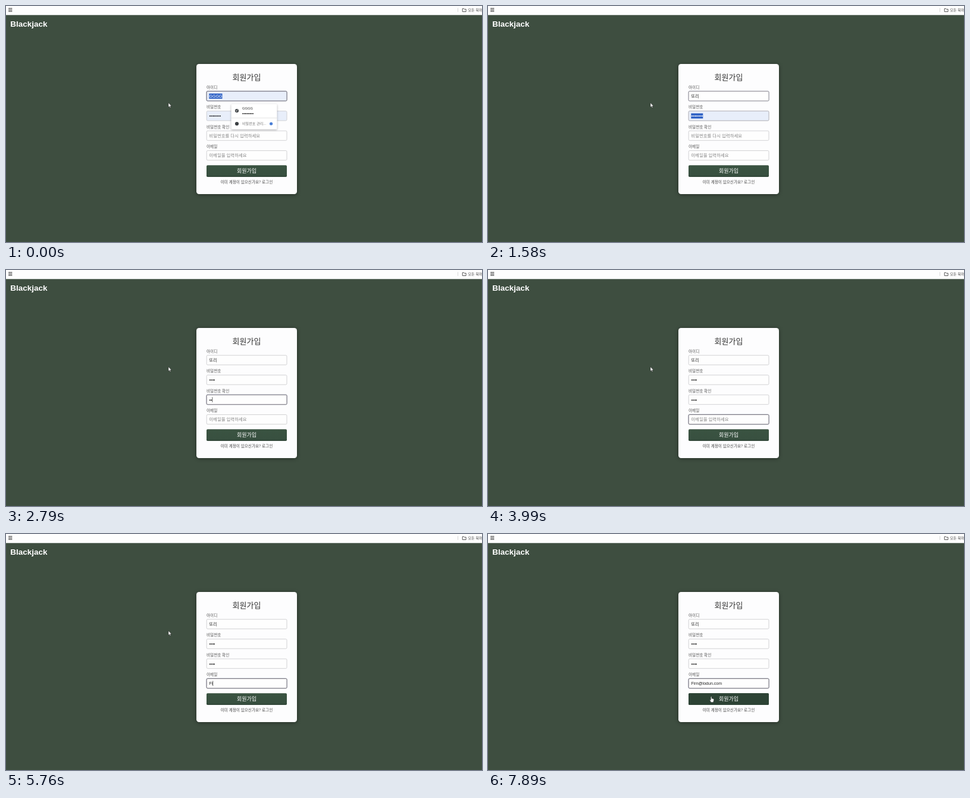
Recreate the animation shown at these times as an HTML page. Size 800 by 399 pixels, loop 7990 ms.

```html
<!DOCTYPE html>
<html lang="ko">
<head>
<meta charset="utf-8">
<title>회원가입</title>
<style>
  html, body { margin: 0; width: 100%; height: 100%; overflow: hidden; background: #3e4e40; }
  svg { display: block; width: 100vw; height: 100vh; }
  text { font-family: "Noto Sans CJK KR", "Noto Sans CJK JP", "Noto Sans", sans-serif; fill: #444; white-space: pre; }
  .brand { font: bold 13.5px "Liberation Sans", Arial, sans-serif; fill: #fff; }
  .title { font-size: 13px; fill: #333; }
  .label { font-size: 6.6px; fill: #555; }
  .hint { font-size: 7.4px; fill: #858585; }
  .value { font-family: "Liberation Sans", "Noto Sans CJK KR", "Noto Sans CJK JP", sans-serif; font-size: 7px; fill: #222; }
  .mail { font-family: "Noto Sans", "Open Sans", sans-serif; font-size: 6px; fill: #333; }
  .mid { text-anchor: middle; }
  .drop { filter: drop-shadow(0 1px 1.5px rgba(0, 0, 0, .32)); }
</style>
</head>
<body>
<svg viewBox="0 0 800 399" preserveAspectRatio="none">
  <defs>
    <linearGradient id="face" x2="0" y2="1">
      <stop offset="0" stop-color="#3a5341"/><stop offset=".85" stop-color="#385040"/><stop offset="1" stop-color="#2f4436"/>
    </linearGradient>
  </defs>
  <rect width="800" height="399" fill="#3e4e40"/>
  <rect width="800" height="15.3" fill="#fefefe"/>
  <path d="M4.4 4.1h5.8M4.4 6.6h5.8M4.4 9.1h5.8" stroke="#555" stroke-width="1.7" stroke-dasharray="1.6 .5"/>
  <path d="M759.5 3.5v6.5" stroke="#ccc" stroke-width=".8"/>
  <path d="M767.2 4.4h2.3l.9 1h2.7v4.2h-5.9z" fill="none" stroke="#444" stroke-width=".9" stroke-linejoin="round"/>
  <text x="776.5" y="9.2" font-size="6">모든 북마크</text>
  <text class="brand" x="7.2" y="35.3">Blackjack</text>

  <rect x="320" y="98" width="169" height="220" rx="4.5" fill="#fdfdfe" style="filter:drop-shadow(0 1.5px 3px rgba(0,0,0,.4))"/>
  <text class="title mid" x="404.5" y="124.6">회원가입</text>
  <g id="fields"></g>
  <rect x="337" y="269.3" width="135" height="19.7" rx="1.8" fill="url(#face)"/>
  <rect id="hover" x="337" y="269.3" width="135" height="19.7" rx="1.8" fill="#2d4335"/>
  <text class="mid" x="404.5" y="282.4" font-size="9" style="fill:#fff">회원가입</text>
  <text class="label mid" x="404.5" y="300.2" style="fill:#444">이미 계정이 있으신가요? 로그인</text>

  <g id="logins">
    <rect class="drop" x="378.5" y="166" width="77" height="42.6" rx="1.5" fill="#fff"/>
    <path d="M378.5 189.3h77" stroke="#ddd" stroke-width=".8"/>
    <circle cx="388" cy="177" r="3.1" fill="#3c4043"/>
    <path d="M386.2 176.6l1.8.6-.4 1.6M388.6 175.2l1.4 1" stroke="#fff" stroke-width=".8" fill="none"/>
    <circle cx="388" cy="199" r="3.1" fill="#3c4043"/>
    <text class="value" x="397" y="174.6" style="font-size:5.8px">GGGG</text>
    <text class="value" x="397" y="184.2" style="font-size:6.8px">••••••••</text>
    <text x="397" y="201.4" font-size="6.1" style="fill:#777">비밀번호 관리...</text>
    <circle cx="445.6" cy="199" r="2.6" fill="#4a7fd6"/>
  </g>
  <g id="mails">
    <rect class="drop" x="378.5" y="264.5" width="75" height="33.5" rx="1.5" fill="#fff"/>
    <text class="mail" x="384" y="276.4">foamum@lodun.com</text>
    <text class="mail" x="384" y="291.6">fen@lodun.com</text>
  </g>
  <path id="arrow" d="M0 0v7.2l1.7-1.5 1.1 2.5 1.2-.5-1.1-2.5h2.2z" fill="#fff" stroke="#222" stroke-width=".45"/>
  <path id="hand" d="M-1.6-4.6q.8-.9 1.5 0v2.8l3 .7q.9.3.8 1.2l-.5 2.5-.7 2h-3.6l-2-3.2q-.3-1 .6-.9l.9.8z" fill="#fff" stroke="#222" stroke-width=".4"/>
</svg>
<script>
const LOOP = 7990, FADE = 300, BLINK = 450;
const $ = id => document.getElementById(id);

function add(parent, tag, attrs, text = '') {
  const el = document.createElementNS('http://www.w3.org/2000/svg', tag);
  for (const k in attrs) el.setAttribute(k, attrs[k]);
  el.textContent = text;
  return parent.appendChild(el);
}

// keys: [time, text]; focus: [from, to]; filled: end of the autofill tint; picked: span with the text selected
const fields = [
  { label: '아이디', hint: '아이디를 입력하세요', focus: [-999, 1490], filled: 370, picked: [0, 370],
    keys: [[0, 'GGGG'], [370, ''], [1020, 'ㄸ'], [1110, '또'], [1210, '똘'], [1390, '또리']] },
  { label: '비밀번호', hint: '비밀번호를 입력하세요', focus: [1490, 2420], filled: 2040, picked: [1490, 2040],
    keys: [[0, '••••••••'], [2040, '•'], [2140, '••'], [2230, '•••'], [2320, '••••']] },
  { label: '비밀번호 확인', hint: '비밀번호를 다시 입력하세요', focus: [2420, 3440], filled: 0, picked: [0, 0],
    keys: [[0, ''], [2600, '•'], [2790, '••'], [2970, '•••'], [3160, '••••']] },
  { label: '이메일', hint: '이메일을 입력하세요', focus: [3440, 9999], filled: 0, picked: [0, 0],
    keys: [[0, ''], [4550, 'ㄹ'], [4830, 'F'], ...typing('Firn@lodun.com', 2,
      [5570, 5850, 6040, 6310, 6500, 6590, 6690, 6780, 6870, 7060, 7150, 7250, 7340])] },
];

function typing(word, start, times) {
  return times.map((t, i) => [t, word.slice(0, start + i)]);
}

fields.forEach((f, i) => {
  const y = 144 + i * 33.45, g = $('fields');
  add(g, 'text', { class: 'label', x: 337, y: y - 4 }, f.label);
  f.halo = add(g, 'rect', { x: 336.5, y: y - .5, width: 136, height: 17.4, rx: 2.4, fill: 'none', stroke: '#c9cdd8', 'stroke-width': 1 });
  f.box = add(g, 'rect', { x: 337.2, y: y + .2, width: 134.8, height: 16.2, rx: 1.8, 'stroke-width': .8 });
  f.mark = add(g, 'rect', { x: 341.3, y: y + 4, height: 8.8, fill: '#2f62c6' });
  f.hintEl = add(g, 'text', { class: 'hint', x: 341.3, y: y + 10.8 }, f.hint);
  f.text = add(g, 'text', { class: 'value', x: 341.5, y: y + 10.8 });
  f.caret = add(g, 'rect', { y: y + 4, width: .7, height: 8.6, fill: '#222' });
});

const show = (el, on) => { el.style.display = on ? '' : 'none'; };
const clamp = v => Math.max(0, Math.min(1, v));
const last = (steps, t) => steps.filter(s => s[0] <= t).pop();
const within = (t, [a, b]) => t >= a && t < b;

function drawField(f, t) {
  const [when, text] = last(f.keys, t);
  const [from, to] = f.focus;
  const glow = clamp((t - from) / FADE) * (1 - clamp((t - to) / FADE));
  const blend = (a, b) => Math.round(a + (b - a) * glow);
  const picked = within(t, f.picked);
  f.box.setAttribute('fill', t < f.filled ? '#e8eefa' : '#fefefe');
  f.box.setAttribute('stroke', `rgb(${blend(200, 88)},${blend(200, 84)},${blend(203, 94)})`);
  f.halo.style.opacity = glow;
  f.text.textContent = text;
  f.text.style.fill = picked ? '#fff' : '#222';
  show(f.hintEl, !text);
  const width = text ? f.text.getComputedTextLength() : 0;
  show(f.mark, picked);
  f.mark.setAttribute('width', width + .4);
  f.caret.setAttribute('x', 341.6 + width);
  show(f.caret, within(t, f.focus) && !picked && t - Math.max(when, from) < BLINK);
}

const pointer = [[0, 273, 163.8], [7710, 302, 196], [7800, 352, 257], [7890, 376, 279.8]];

function draw(t) {
  fields.forEach(f => drawField(f, t));
  show($('logins'), t < 1020);
  show($('mails'), within(t, [4830, 5570]));
  const [, x, y] = last(pointer, t), over = t >= 7890;
  show($('hover'), over);
  show($('hand'), over);
  show($('arrow'), !over);
  $(over ? 'hand' : 'arrow').setAttribute('transform', `translate(${x} ${y})`);
}

const begin = performance.now();
function tick() {
  draw((performance.now() - begin) % LOOP);
  requestAnimationFrame(tick);
}
tick();
</script>
</body>
</html>
```
